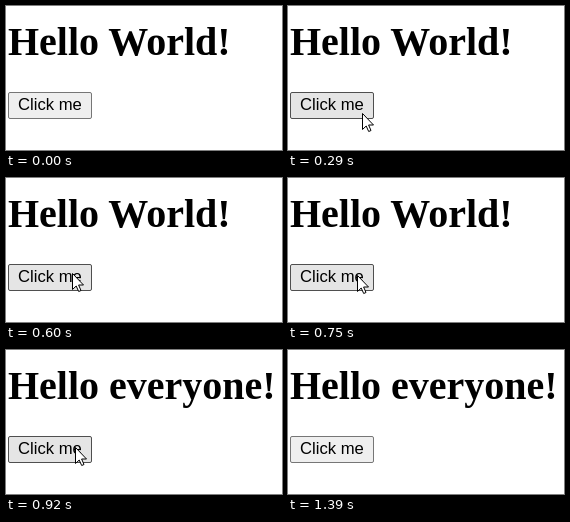
Recreate the animation shown at these times as an HTML page. Size 276 px wide and 144 px high, loop 2330 ms.

```html
<!DOCTYPE html>
<html lang="en">
<head>
<meta charset="utf-8">
<title>Click me</title>
<style>
  html, body { margin: 0; height: 100%; overflow: hidden; background: #fff; }
  svg { display: block; width: 276px; height: 144px; }
  #heading { font: bold 40px "Liberation Serif", serif; }
  #label { font: 16.67px "Liberation Sans", sans-serif; }
</style>
</head>
<body>
<svg viewBox="0 0 276 144">
  <text id="heading" x="2" y="49">Hello World!</text>
  <rect id="button" x="2.5" y="86.5" width="83" height="26" rx="1.5"/>
  <text id="label" x="12" y="104">Click me</text>
  <path id="cursor" d="M.5 .5V16.5L4.2 13L6.7 18.5L9 17.5L6.6 12H11.5Z" fill="#fff" stroke="#000"/>
  <circle id="halo" r="15" fill="#ff0" fill-opacity=".47"/>
</svg>
<script>
const DURATION = 2330;
const SKINS = {
  idle: ['#efefef', '#767676'],
  hover: ['#e5e5e5', '#4f4f4f'],
  active: ['#f5f5f5', '#8d8d8d']
};
// Start time, pointer tip (null when off stage), button skin, click halo
const STEPS = [
  [0, null, 'idle'],
  [140, [155, 134], 'idle'],
  [220, [95, 117], 'idle'],
  [290, [74, 107], 'hover'],
  [370, [67, 101], 'hover'],
  [450, [66, 99], 'hover'],
  [520, [66, 97], 'hover'],
  [600, [66, 95], 'hover'],
  [690, [69, 97], 'hover'],
  [770, [69, 97], 'hover', true],
  [850, [69, 97], 'active', true],
  [920, [69, 97], 'hover'],
  [1150, [73, 98], 'hover'],
  [1230, [95, 110], 'idle'],
  [1310, [157, 134], 'idle'],
  [1390, null, 'idle']
];
const GREETING_TIME = 920;
const [heading, button, halo, cursor] =
  ['heading', 'button', 'halo', 'cursor'].map(id => document.getElementById(id));

function place(element, point, visible) {
  element.style.display = visible ? '' : 'none';
  if (visible) element.setAttribute('transform', `translate(${point})`);
}

function draw() {
  const time = performance.now() % DURATION;
  const [, tip, skin, clicking] = STEPS.findLast(([start]) => start <= time);
  const [fill, border] = SKINS[skin];
  heading.textContent = time < GREETING_TIME ? 'Hello World!' : 'Hello everyone!';
  button.setAttribute('fill', fill);
  button.setAttribute('stroke', border);
  place(cursor, tip, tip);
  place(halo, tip, clicking);
  requestAnimationFrame(draw);
}
draw();
</script>
</body>
</html>
```
